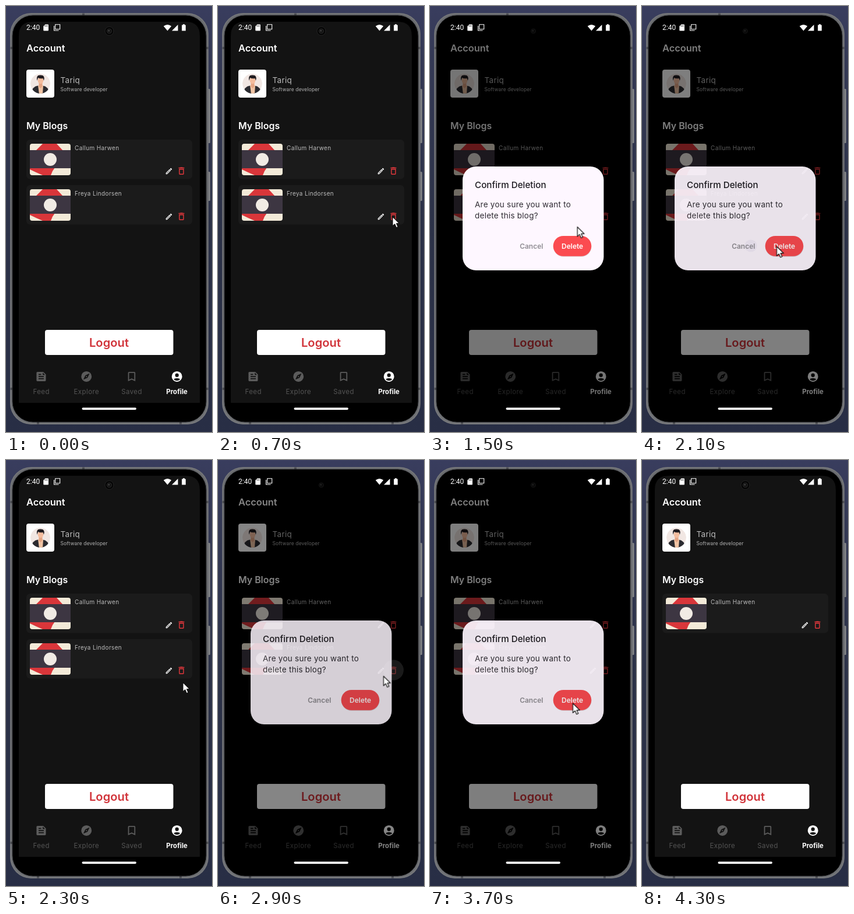
Write an HTML page that moves like this. It is 354 by 730 pixels and loops after 4700 ms.

```html
<!DOCTYPE html>
<html lang="en">
<head>
<meta charset="utf-8">
<title>Delete a blog</title>
<style>
  html, body { margin: 0; width: 100%; height: 100%; overflow: hidden; background: #2c3248; }
  svg { display: block; }
  #stage { position: absolute; left: 0; top: 0; width: 354px; height: 730px; }
  text { font-family: Inter, Roboto, sans-serif; fill: #fff; white-space: pre; }

  .heading { font-size: 16.4px; font-weight: 600; }
  .name { font-size: 13.5px; letter-spacing: .3px; fill: #bcbcbc; }
  .role { font-size: 8.5px; letter-spacing: .15px; fill: #b4b4b4; }
  .author { font-size: 10px; letter-spacing: .36px; fill: #bcbcbc; }
  .logout { font-size: 20.2px; font-weight: 600; fill: #d1343a; text-anchor: middle; }
  .nav text { font-size: 11.5px; letter-spacing: .4px; text-anchor: middle; fill: #545454; }
  .nav use { fill: #5c5c5c; }
  .nav .on { fill: #fff; }
  .nav text.on { font-weight: 700; letter-spacing: 0; }
  .clock { font: 12px Roboto, sans-serif; }
  .title { font-size: 15.2px; font-weight: 500; fill: #1d1b20; }
  .body { font-size: 13.5px; letter-spacing: .25px; fill: #2e2b32; }
  .action { font-size: 12px; font-weight: 600; text-anchor: middle; }

  /* 4700 ms loop, advancing in 100 ms ticks */
  .anim { animation: 4700ms step-end infinite; }
  .lit { animation-name: lit; }
  .card { animation-name: card; fill: #1b1b1b; }
  .removed { animation-name: removed; }
  .scrim { animation-name: scrim; }
  .dialog { animation-name: dialog; }
  .tap-bin { animation-name: tap-bin; opacity: 0; }
  .tap-cancel { animation-name: tap-cancel; opacity: 0; }
  .cursor { animation-name: cursor; }

  @keyframes lit {
    0%, 48.93%, 82.97%, 100% { opacity: 1; }
    19.14%, 59.57% { opacity: 0; }
    46.8%, 80.85% { opacity: .7; }
  }
  @keyframes card {
    0%, 48.93%, 82.97%, 100% { opacity: 1; }
    23.4%, 61.7% { opacity: 0; }
    46.8%, 80.85% { opacity: .7; }
  }
  @keyframes removed {
    0% { visibility: visible; }
    80.85%, 100% { visibility: hidden; }
  }
  @keyframes scrim {
    0%, 48.93%, 82.97%, 100% { opacity: 0; }
    19.14%, 59.57% { opacity: .35; }
    21.27% { opacity: .83; }
    23.4%, 63.82% { opacity: 1; }
    44.68%, 78.72% { opacity: .94; }
    46.8%, 80.85% { opacity: .25; }
    61.7% { opacity: .89; }
  }
  @keyframes dialog {
    0%, 48.93%, 82.97%, 100% { opacity: 0; }
    19.14%, 59.57% { opacity: .28; }
    21.27% { opacity: .77; }
    23.4%, 63.82% { opacity: 1; }
    44.68%, 78.72% { opacity: .92; }
    46.8%, 80.85% { opacity: .2; }
    61.7% { opacity: .84; }
  }
  @keyframes tap-bin {
    0%, 63.82%, 100% { opacity: 0; }
    59.57% { opacity: .14; }
    61.7% { opacity: .2; }
  }
  @keyframes tap-cancel {
    0%, 46.8%, 100% { opacity: 0; }
    42.55% { opacity: .08; }
    44.68% { opacity: .06; }
  }
  @keyframes cursor {
    0% { transform: translate(362px, 470px); }
    4.25% { transform: translate(362px, 470px); animation-timing-function: steps(5); }
    14.89% { transform: translate(300px, 361px); animation-timing-function: steps(3); }
    21.27% { transform: translate(297.5px, 359px); }
    27.65% { transform: translate(297.5px, 359px); animation-timing-function: steps(5); }
    38.29% { transform: translate(187px, 408px); }
    44.68% { transform: translate(231.5px, 412px); }
    46.8% { transform: translate(280px, 395px); }
    48.93% { transform: translate(304px, 381px); animation-timing-function: steps(2); }
    53.19% { transform: translate(301px, 364px); }
    55.31% { transform: translate(299px, 360px); }
    59.57% { transform: translate(297px, 362px); }
    61.7% { transform: translate(284.5px, 370.5px); animation-timing-function: steps(3); }
    68.08% { transform: translate(251px, 411px); animation-timing-function: steps(2); }
    72.34% { transform: translate(245.5px, 417px); }
    82.97% { transform: translate(248px, 424px); }
    85.1% { transform: translate(265px, 490px); animation-timing-function: steps(2); }
    89.36% { transform: translate(318px, 690px); }
    91.48%, 100% { transform: translate(340px, 760px); }
  }
</style>
</head>
<body>
<svg id="stage" viewBox="0 0 354 730">
  <defs>
    <linearGradient id="wall" x2="0" y2="1">
      <stop offset="0" stop-color="#393d5e"/>
      <stop offset=".12" stop-color="#343955"/>
      <stop offset=".5" stop-color="#2c3248"/>
      <stop offset="1" stop-color="#282e45"/>
    </linearGradient>
    <linearGradient id="metal" x2="0" y2="1">
      <stop offset="0" stop-color="#6b6d70"/>
      <stop offset=".5" stop-color="#5c5e61"/>
      <stop offset="1" stop-color="#707275"/>
    </linearGradient>
    <clipPath id="thumbClip"><rect width="70" height="54" rx="4"/></clipPath>
    <clipPath id="faceClip"><circle cx="59" cy="133" r="17"/></clipPath>

    <symbol id="edit" viewBox="0 0 24 24"><path d="M14.06 9.02l.92.92L5.92 19H5v-.92l9.06-9.06M17.66 3c-.25 0-.51.1-.7.29l-1.83 1.83 3.75 3.75 1.83-1.83c.39-.39.39-1.02 0-1.41l-2.34-2.34c-.2-.2-.45-.29-.71-.29zm-3.6 3.19L3 17.25V21h3.75L17.81 9.94z"/></symbol>
    <symbol id="bin" viewBox="0 0 24 24"><path d="M6 19c0 1.1.9 2 2 2h8c1.1 0 2-.9 2-2V7H6zM8 9h8v10H8zm7.5-5l-1-1h-5l-1 1H5v2h14V4z"/></symbol>
    <symbol id="feed" viewBox="0 0 24 24"><path d="M16 3H5c-1.1 0-2 .9-2 2v14c0 1.1.9 2 2 2h14c1.1 0 2-.9 2-2V8zM7 7h5v2H7zm10 10H7v-2h10zm0-4H7v-2h10zm-2-4V4.5L19.5 9z"/></symbol>
    <symbol id="explore" viewBox="0 0 24 24"><path d="M12 10.9a1.1 1.1 0 1 0 0 2.2 1.1 1.1 0 1 0 0-2.2zM12 2a10 10 0 1 0 0 20 10 10 0 1 0 0-20zm2.19 12.19L6 18l3.81-8.19L18 6z" fill-rule="evenodd"/></symbol>
    <symbol id="saved" viewBox="0 0 24 24"><path d="M17 3H7c-1.1 0-2 .9-2 2v16l7-3 7 3V5c0-1.1-.9-2-2-2zm0 15l-5-2.18L7 18V5h10z"/></symbol>
    <symbol id="profile" viewBox="0 0 24 24"><path d="M12 2a10 10 0 1 0 0 20 10 10 0 1 0 0-20zm0 4a3.5 3.5 0 1 1 0 7 3.5 3.5 0 1 1 0-7zm0 14c-2.03 0-4.43-.82-6.14-2.88C7.55 15.8 9.68 15 12 15s4.45.8 6.14 2.12C16.43 19.18 14.03 20 12 20z" fill-rule="evenodd"/></symbol>

    <g id="thumb" clip-path="url(#thumbClip)">
      <rect width="70" height="54" fill="#f3ead8"/>
      <path d="M10 12L22 0H46L57 12zM0 41H43Q38 47 36 54H22Q10 49 0 44z" fill="#d9363a"/>
      <rect y="11" width="70" height="31" fill="#3d3642"/>
      <circle cx="35" cy="27" r="11" fill="#f1ebe4"/>
    </g>
    <g id="entry">
      <use href="#thumb" x="41" y="236"/>
      <use href="#edit" x="273" y="276" width="14" height="14" fill="#fff"/>
      <use href="#bin" x="293" y="274" width="17" height="17" fill="#e5383d"/>
    </g>
  </defs>

  <rect width="354" height="730" fill="url(#wall)"/>

  <!-- phone body -->
  <g fill="#7c7e82">
    <rect x="346" y="142" width="5" height="93" rx="1.5"/>
    <rect x="346" y="284" width="5" height="50" rx="1.5"/>
  </g>
  <rect x="7" y="12" width="341" height="705" rx="36" fill="url(#metal)"/>
  <path d="M7 72h4M7 656h4M344 72h4M344 656h4M133 12v4M55 713v4M300 713v4" stroke="#3f4145" stroke-width="4"/>
  <rect x="8" y="13" width="339" height="703" rx="35" fill="none" stroke="#808286" stroke-width=".8"/>
  <rect x="11" y="16" width="333" height="697" rx="35" fill="#000" stroke="#2e2f32"/>

  <!-- screen -->
  <path class="anim lit" d="M22 680V51Q22 27 46 27H309Q333 27 333 51V680z" fill="#131313"/>
  <circle class="anim lit" cx="177.5" cy="43" r="7.5" fill="#050505" stroke="#242424"/>
  <circle cx="177.5" cy="43" r="4" fill="#131313" stroke="#2a2a2a"/>
  <circle cx="176.8" cy="42.4" r="1.3" fill="#444"/>

  <text class="heading" x="35" y="78">Account</text>
  <rect x="35" y="109" width="48" height="48" rx="4" fill="#fff"/>
  <g clip-path="url(#faceClip)">
    <circle cx="59" cy="133" r="17" fill="#f1e7e3"/>
    <path d="M43 152Q44 138 55 136.5H63Q74 138 75 152z" fill="#2b2b30"/>
    <path d="M55 136L57 151H63L64 136z" fill="#f0c4a4"/>
    <path d="M56.5 130h6v8l-3 3-3-3z" fill="#e5a584"/>
    <ellipse cx="59.5" cy="127.5" rx="4.8" ry="6" fill="#f4bd9e"/>
    <path d="M53.5 128Q51 118 59 118.5Q68 118 65 128L63.5 124Q58 125 55 123z" fill="#201c20"/>
  </g>
  <text class="name" x="93.5" y="132">Tariq</text>
  <text class="role" x="93.5" y="146">Software developer</text>

  <text class="heading" x="35" y="211" style="font-size:15.9px">My Blogs</text>
  <rect class="anim card" x="35" y="229" width="285" height="67.5" rx="6"/>
  <use href="#entry"/>
  <text class="author" x="118" y="247">Callum Harwen</text>
  <g class="anim removed">
    <rect class="anim card" x="35" y="307" width="285" height="67.5" rx="6"/>
    <use href="#entry" y="78"/>
    <text class="author" x="118" y="325">Freya Lindorsen</text>
    <circle class="anim tap-bin" cx="301.5" cy="360" r="17.5" fill="#fff"/>
  </g>

  <rect x="67" y="555" width="220.5" height="43" rx="4" fill="#fff"/>
  <text class="logout" x="177" y="584">Logout</text>

  <g class="nav">
    <use href="#feed" x="49.7" y="624.2" width="21.5" height="21.5"/>
    <use href="#explore" x="127.5" y="624.2" width="21.5" height="21.5"/>
    <use href="#saved" x="205.2" y="624.2" width="21.5" height="21.5"/>
    <use class="on" href="#profile" x="283" y="624.2" width="21.5" height="21.5"/>
    <text x="60.7" y="665">Feed</text>
    <text x="138.3" y="665">Explore</text>
    <text x="216" y="665">Saved</text>
    <text class="on" x="293.6" y="665">Profile</text>
  </g>

  <rect class="anim scrim" x="11.5" y="16.5" width="332" height="696" rx="34.5" fill="#000" fill-opacity=".54"/>

  <!-- system bars -->
  <text class="clock" x="35" y="41.3">2:40</text>
  <g fill="#fff">
    <path d="M67.5 31.5H72Q73 31.5 73 32.5V41.5Q73 42.5 72 42.5H65.3Q64.3 42.5 64.3 41.5V34.7z"/>
    <path d="M277.5 42.5L270.8 34.5Q277.5 29.5 284.2 34.5z"/>
    <path d="M285 42.5L295.5 32V42.5z"/>
    <path d="M304 32.5V31.3H307V32.5H308.8V42.5H302.2V32.5z"/>
    <rect x="130.5" y="688.3" width="93.5" height="3.6" rx="1.8"/>
  </g>
  <path d="M67 33v2.5M69 33v2.5M71 33v2.5" stroke="#222" stroke-width=".8"/>
  <path d="M84.7 31.8h8v8h-8zM82.6 34v8h8" fill="none" stroke="#fff" stroke-width="1.1"/>

  <!-- confirmation -->
  <g class="anim dialog">
    <rect x="56" y="275" width="242.5" height="178" rx="23" fill="#fef7ff"/>
    <text class="title" x="77" y="312">Confirm Deletion</text>
    <text class="body" x="77" y="345">Are you sure you want to</text>
    <text class="body" x="77" y="364.3">delete this blog?</text>
    <circle class="anim tap-cancel" cx="187" cy="411" r="10.5" fill="#6750a4"/>
    <text class="action" x="174.3" y="416" style="fill:#918e94">Cancel</text>
    <rect x="212" y="395" width="65.5" height="34.8" rx="17.4" fill="#000" opacity=".14"/>
    <rect x="211.7" y="394" width="65.6" height="34.8" rx="17.4" fill="#fb4b50"/>
    <text class="action" x="244.6" y="416">Delete</text>
  </g>

  <g class="anim cursor">
    <path d="M0 0V16.3L3.8 12.8L6.4 18.8L9.3 17.5L6.7 11.7H11.8z" fill="#fff" stroke="#111" stroke-width="1.2" stroke-linejoin="round"/>
  </g>
</svg>
</body>
</html>
```
